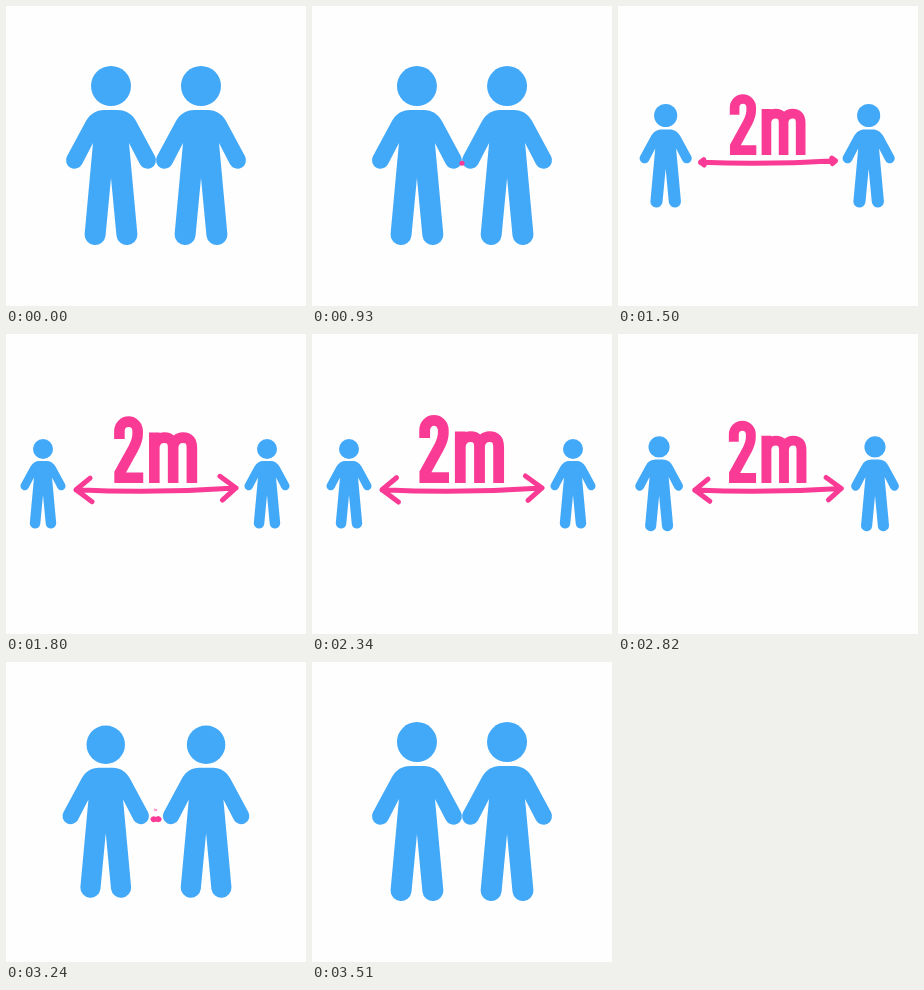
An HTML page that plays this animation: 300 px wide and 300 px high, repeating every 3.66 s.

```html
<!DOCTYPE html>
<html lang="en">
<head>
<meta charset="utf-8">
<title>Keep your distance</title>
<style>
  html, body { margin: 0; width: 100%; height: 100%; overflow: hidden; background: #fefefe; }
  svg { display: block; width: 100vw; height: 100vh; }
  .person { fill: #42a8f8; }
  .pink { fill: none; stroke: #fa3b95; }
</style>
</head>
<body>
<svg viewBox="0 0 300 300" role="img" aria-label="Two people keep 2m apart">
  <defs>
    <g id="person">
      <circle cy="-70" r="20"/>
      <path d="M-7 -46H7C15 -46 21 -42 25 -35L44 .2A8.5 8.5 0 0 1 29 8.2L18 -13
               L26.4 78.2A10.5 10.5 0 0 1 5.5 80L0 22L-5.5 80A10.5 10.5 0 0 1 -26.4 78.2
               L-18 -13L-29 8.2A8.5 8.5 0 0 1 -44 .2L-25 -35C-21 -42 -15 -46 -7 -46Z"/>
    </g>
  </defs>
  <use id="left" class="person" href="#person"/>
  <use id="right" class="person" href="#person"/>
  <path id="arrow" class="pink" stroke-width="5" stroke-linecap="round" stroke-linejoin="round"/>
  <!-- condensed lettering, origin at the middle of its baseline -->
  <g id="label" class="pink" stroke-width="10.8">
    <path d="M-36.8 -45V-53A9.3 9.6 0 0 1 -18.2 -53V-50C-18.2 -44 -20 -40.5 -22.3 -36L-36.6 -10V-5.4H-12.5"/>
    <path d="M-1.2 0V-51.5M-1.2 -37C-.5 -43 4.5 -46.3 9 -46.3C15 -46.3 18 -43 18 -36V0
             M18 -37C18.7 -43 23.5 -46.3 28 -46.3C34 -46.3 37.1 -43 37.1 -36V0"/>
  </g>
</svg>
<script>
const LOOP = 3660, LEAVE = 900, BACK = 2670;
const byId = id => document.getElementById(id);
const [left, right, arrow, label] = ['left', 'right', 'arrow', 'label'].map(byId);

// Cubic timing curve through (0,0), (x1,y1), (x2,y2), (1,1)
function bezier(x1, y1, x2, y2) {
  const at = (s, a, b) => 3 * s * (1 - s) ** 2 * a + 3 * s * s * (1 - s) * b + s ** 3;
  return x => {
    if (x <= 0) return 0;
    if (x >= 1) return 1;
    let lo = 0, hi = 1;
    for (let i = 0; i < 24; i++) {
      const mid = (lo + hi) / 2;
      if (at(mid, x1, x2) < x) lo = mid; else hi = mid;
    }
    return at(lo, y1, y2);
  };
}

const easeApart = bezier(.62, 0, .36, 1);
const easeBack = bezier(.5, 0, .14, 1);
const easeHeads = bezier(.33, 0, .3, 1);
const easeLabel = bezier(.56, 0, .7, .7);

const apart = t => easeApart((t - LEAVE) / 910);
const shrink = (t, duration) => 1 - easeBack((t - BACK) / duration);

// Grows to full size, then rings like a damped spring
function pop(t) {
  const over = (t - LEAVE - 660) / 1000;
  if (over < 0) return easeLabel((t - LEAVE) / 660);
  return 1 + .066 * Math.sin(6 * Math.PI * over) * Math.exp(-5 * over);
}

function place(person, x, scale) {
  person.setAttribute('transform', `translate(${x} 150) scale(${scale})`);
}

function arrowPath(reach, head) {
  const tip = k => [150 + 80 * k, 157.2 - .9 * k - 2.35 * k * k];
  const a = tip(-reach), b = tip(reach);
  const bend = 2 * 157.2 - (a[1] + b[1]) / 2;
  const barbs = ([x, y], [ux, uy], [lx, ly]) =>
    `M${x + ux * head} ${y + uy * head}L${x} ${y}L${x + lx * head} ${y + ly * head}`;
  return `M${a}Q150 ${bend} ${b}` +
    barbs(a, [14.5, -12], [16.5, 12.3]) +
    barbs(b, [-16.5, -12], [-14, 12.5]);
}

function draw(t) {
  const gap = apart(t) * shrink(t, 870);
  place(left, 105 - 68 * gap, 1 - gap / 2);
  place(right, 195 + 66 * gap, 1 - gap / 2);

  const closing = shrink(t, 765);
  const shown = t >= 930 && t < 3510;
  arrow.style.display = label.style.display = shown ? '' : 'none';
  arrow.setAttribute('d', arrowPath(
    Math.max(apart(t) * closing, .001),
    easeHeads((t - 1380) / 520) * closing));
  label.setAttribute('transform', `translate(149.5 149) scale(${pop(t) * closing})`);
}

const start = performance.now();
function tick() {
  draw((performance.now() - start) % LOOP);
  requestAnimationFrame(tick);
}
tick();
</script>
</body>
</html>
```
